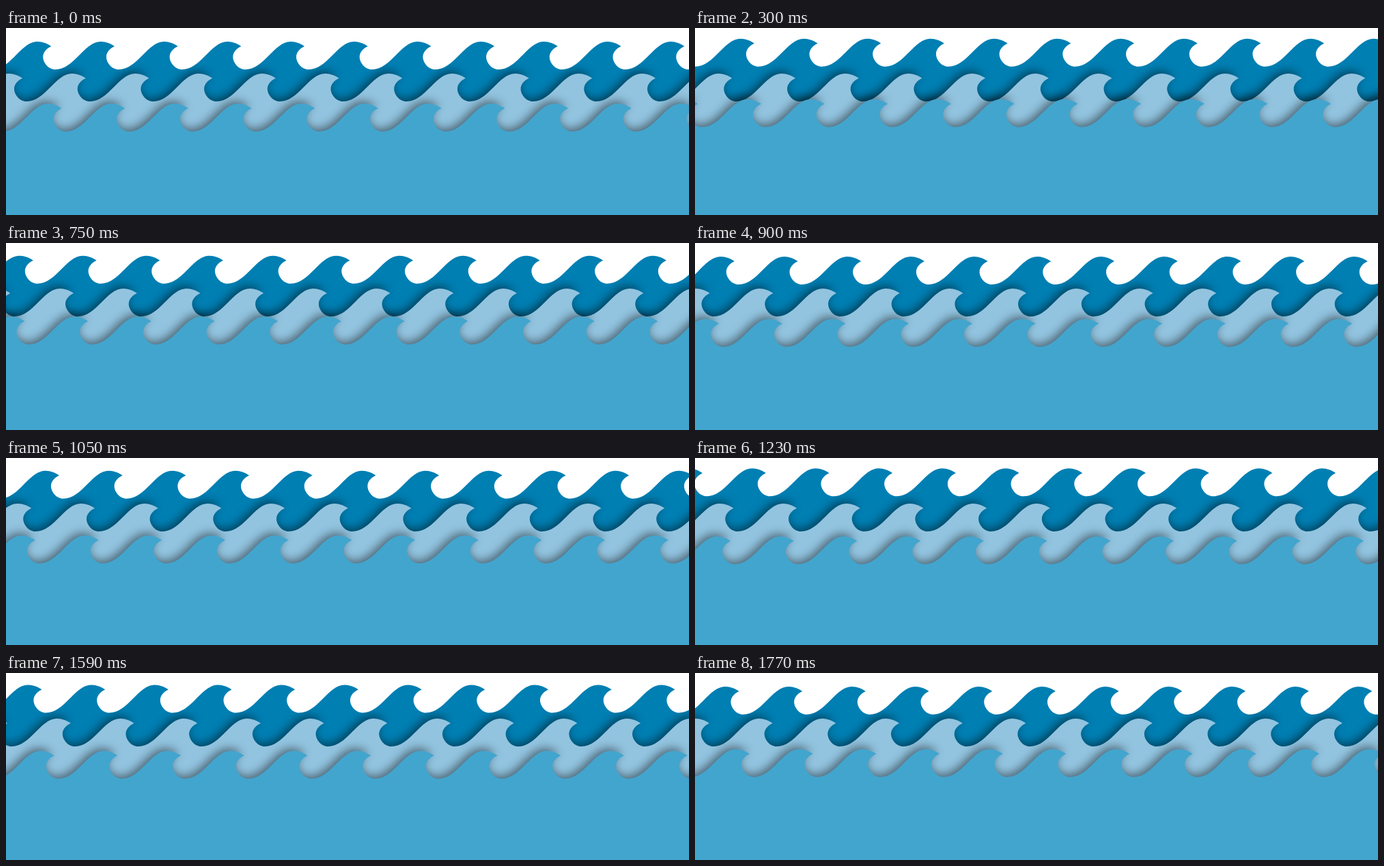
Recreate the animation shown at these times as an HTML page. Size 1000x275 px, loop 1800 ms.

```html
<!DOCTYPE html>
<html lang="en">
<head>
<meta charset="utf-8">
<title>Waves</title>
<style>
  html, body { margin: 0; width: 100%; height: 100%; overflow: hidden; background: #fff; }
  svg { display: block; width: 100%; height: 100%; }
</style>
</head>
<body>
<svg viewBox="0 0 1000 275">
  <defs>
    <filter id="shade" filterUnits="userSpaceOnUse" x="-250" y="-40" width="1700" height="460" color-interpolation-filters="sRGB">
      <feDropShadow dx="-3.5" dy="-3.5" stdDeviation="7" flood-color="#000" flood-opacity=".48"/>
    </filter>
    <clipPath id="sea"><use href="#back"/></clipPath>
  </defs>
  <path id="back" fill="#007fb3"/>
  <g clip-path="url(#sea)">
    <g filter="url(#shade)"><path id="middle" fill="#92c4e0"/></g>
    <g filter="url(#shade)"><path id="front" fill="#42a5ce"/></g>
  </g>
</svg>
<script>
const LOOP = 1800, STEP = 30, PERIOD = 92.7, TILES = 14;

// One crest, its curl and the slope up to the next crest; x = 0 is the inside of the curl.
function wavePath() {
  let d = 'M-8 0';
  for (let i = 0; i < TILES; i++) {
    const o = i * PERIOD;
    const curve = (...p) => {
      d += 'C' + p.map((v, k) => k % 2 ? v : (v + o).toFixed(2)).join(' ');
    };
    curve(-1, 0, 7, 3, 12, 7);
    curve(5, 10, 0, 16, 0, 22.5);
    curve(0, 31, 8, 41, 18, 41);
    curve(46, 41, 60, 0, PERIOD - 8, 0);
  }
  return d + 'V300H-8Z';
}

// Swing with n cycles per loop; u and peak are fractions of the loop.
const swing = (u, n, size, peak = 0) => size * Math.cos(2 * Math.PI * n * (u - peak));

// Each layer drifts a whole number of wave lengths per loop, sways and bobs.
const layers = [
  {
    id: 'back',
    x: u => 51 + 2 * PERIOD * u + swing(u, 1, 10.6, 0.815) + swing(u, 2, 1.8, 0.327),
    y: u => 17.2 + swing(u, 2, 2.9)
  },
  {
    id: 'middle',
    x: u => 10.8 + 2 * PERIOD * u + swing(u, 1, 1.2),
    y: () => 67
  },
  {
    id: 'front',
    x: u => 69.5 + PERIOD * u,
    y: u => 110.45 - swing(u, 1, 5.9, 0.245) - swing(u, 2, 1.05, 0.245)
  }
];

for (const layer of layers) {
  layer.el = document.getElementById(layer.id);
  layer.el.setAttribute('d', wavePath());
}

function draw(ms) {
  const u = Math.floor(ms % LOOP / STEP) * STEP / LOOP;
  for (const { el, x, y } of layers) {
    const shift = x(u) % PERIOD - 2 * PERIOD;
    el.setAttribute('transform', `translate(${shift.toFixed(2)} ${y(u).toFixed(2)})`);
  }
}

const start = performance.now();
function tick() {
  draw(performance.now() - start);
  requestAnimationFrame(tick);
}
tick();
</script>
</body>
</html>
```
